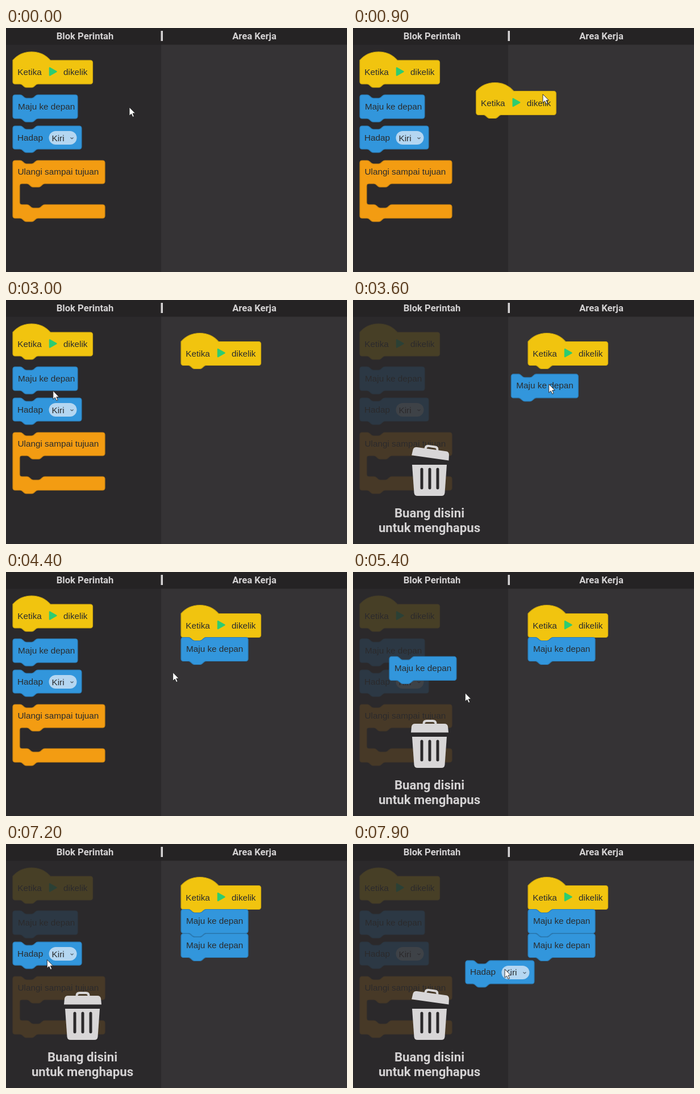
Animation of 600 by 431 pixels, one loop 8 s. Source, as an HTML page:

```html
<!DOCTYPE html>
<html lang="id">
<head>
<meta charset="utf-8">
<style>
  html, body { margin: 0; height: 100%; overflow: hidden; background: #2b292b; }
  svg { display: block; width: 600px; height: 431px; }
  text { font: 15.3px "Liberation Sans", Arial, sans-serif; fill: #2a2c2e; }
  .head, .hint { font: bold 16.6px Roboto, sans-serif; fill: #d4d2d3; text-anchor: middle; }
  .hint { font-size: 22.2px; }
  .yellow { fill: #f1c40f; stroke: #c9a410; }
  .blue { fill: #3296dc; stroke: #2a7cb6; }
  .orange { fill: #f39c12; stroke: #c98412; }
</style>
</head>
<body>
<svg viewBox="0 0 600 431">
  <rect width="600" height="431" fill="#2b292b"/>
  <rect x="273" width="327" height="431" fill="#353335"/>
  <rect width="600" height="29.5" fill="#252324"/>
  <rect x="272.5" y="5" width="3.5" height="18" fill="#d4d2d3"/>
  <text class="head" x="139" y="20">Blok Perintah</text>
  <text class="head" x="437" y="20">Area Kerja</text>
  <g id="palette"></g>
  <g id="trash" fill="#d8d6d7">
    <path d="M104 291H165L161.500 340.500Q161 346 155.500 346H113.500Q108 346 107.500 340.500Z"/>
    <path d="M121 299V332M135 299V332M149 299V332" stroke="#2b292b" stroke-width="5" stroke-linecap="round"/>
    <g id="lid">
      <path d="M102 283.500L103 273Q104 268 109 268H161Q166 268 167 273L168 283.500Z"/>
      <path d="M124.500 270V268Q124.500 263 129.500 263H140.500Q145.500 263 145.500 268V270" fill="none" stroke="#d8d6d7" stroke-width="4"/>
    </g>
    <text class="hint" x="134.500" y="384">Buang disini</text>
    <text class="hint" x="134.500" y="410">untuk menghapus</text>
  </g>
  <g id="work"></g>
  <path id="cursor" d="M0 0V15L3.500 11.800L6 17.300L8.400 16.300L6 10.800H10.500Z" fill="#fff" stroke="#222" stroke-width=".9"/>
</svg>
<script>
const $ = id => document.getElementById(id);

// Connector edge, drawn left to right and right to left
const notch = 'c2 0 3 .8 4 1.800l3 2.700c1 .8 2 1.500 4 1.500h9c2 0 3-.7 4-1.500l3-2.700c1-1 2-1.800 4-1.800';
const tab = 'c-2 0-3 .8-4 1.800l-3 2.700c-1 .8-2 1.500-4 1.500h-9c-2 0-3-.7-4-1.500l-3-2.700c-1-1-2-1.800-4-1.800';
const topEdge = w => `a4 4 0 0 1 4-4h9${notch}h${w - 48}a4 4 0 0 1 4 4`;
const bottomEdge = w => `a4 4 0 0 1-4 4h${48 - w}${tab}h-9a4 4 0 0 1-4-4z`;
const shape = (color, d) => `<path class="${color}" d="${d}" stroke-width="1.200"/>`;
const label = (x, y, s) => `<text x="${x}" y="${y}">${s}</text>`;

const start = shape('yellow', `M12 57c17-20 49-20 66 0h70.500a4 4 0 0 1 4 4v34${bottomEdge(140.5)}`) +
  '<path d="M77 70.500L88.500 77L77 83.500Z" fill="#2ecc71" stroke="#2ecc71" stroke-width="2.500" stroke-linejoin="round"/>' +
  label(20.3, 83, 'Ketika') + label(101, 83, 'dikelik');
const forward = w => shape('blue', `M12 122${topEdge(w)}v34${bottomEdge(w)}`) + label(21, 143.5, 'Maju ke depan');
const turn = shape('blue', `M12 177${topEdge(121)}v33${bottomEdge(121)}`) + label(20, 198.5, 'Hadap') +
  '<rect x="75.500" y="182" width="49" height="24" rx="12" fill="#b4d6f1"/>' + label(80.5, 199.5, 'Kiri') +
  '<path d="M113.500 193.500l2.500 2.300l2.500-2.300" fill="none" stroke="#4a5a68" stroke-width="1.200"/>';
const repeat = shape('orange', `M12 238${topEdge(162)}v33a4 4 0 0 1-4 4H68${tab}h-9a4 4 0 0 0-4 4` +
  `v29a4 4 0 0 0 4 4h9${notch}H170a4 4 0 0 1 4 4v16${bottomEdge(162)}`) + label(20.5, 258.5, 'Ulangi sampai tujuan');

$('palette').innerHTML = start + forward(114) + turn + repeat;

// Each drag: where and when the block is grabbed, how far it goes, when the pointer leaves it
const drags = [
  { art: start, grab: [78, 74], begin: 400, time: 650, to: [296, 27], lift: -10.5, leave: 2600 },
  { art: forward(118), grab: [49, 151], begin: 3100, time: 510, to: [296, -2.5], leave: 4100, bin: true },
  { art: forward(118), grab: [86, 159], begin: 5150, time: 600, to: [296, 40.5], leave: 5900, bin: true },
  { art: turn, grab: [65, 198], begin: 7100, time: 890, to: [208, 19], leave: 8000, bin: true }
];
const home = [217, 140], sag = 42, lag = 90;
$('work').innerHTML = drags.map(d => `<g>${d.art}</g>`).join('');

const clamp = u => Math.min(1, Math.max(0, u));
const ease = u => (u = clamp(u), u * u * (3 - 2 * u));
const add = (a, b) => [a[0] + b[0], a[1] + b[1]];

// Every hand movement is an eased, slightly sagging line
const arc = (a, b, p) => [
  a[0] + (b[0] - a[0]) * p,
  a[1] + (b[1] - a[1]) * p + sag * 4 * p * (1 - p)
];
const offset = (d, t) => add(
  arc([0, 0], d.to, ease((t - d.begin) / d.time)),
  [0, (d.lift || 0) * ease((t - d.leave + 300) / 300)]
);

function pointer(t) {
  let from = home, left = 0;
  for (const d of drags) {
    if (t < d.begin) return arc(from, d.grab, ease((t - left) / (d.begin - left)));
    if (t < d.leave) return add(d.grab, offset(d, t));
    from = add(d.grab, offset(d, d.leave));
    left = d.leave;
  }
  return from;
}

const place = (el, [x, y]) => el.setAttribute('transform', `translate(${x} ${y})`);
const show = (el, on) => el.style.display = on ? '' : 'none';

function draw(now) {
  const t = Math.floor(now % 8000 / 100) * 100; // ten steps a second
  const drag = drags.find(d => d.bin && t >= d.begin && t < d.leave);
  $('palette').setAttribute('opacity', drag ? .14 : 1);
  show($('trash'), drag);
  const tilt = drag ? 8 * clamp((t - drag.begin - 250) / 200) : 0;
  $('lid').setAttribute('transform', `rotate(${tilt} 168 287)`);
  drags.forEach((d, i) => {
    const el = $('work').children[i];
    show(el, t >= d.begin);
    place(el, offset(d, t - lag));
  });
  place($('cursor'), pointer(t));
}

const opened = performance.now();
function loop() {
  draw(performance.now() - opened);
  requestAnimationFrame(loop);
}
loop();
</script>
</body>
</html>
```
